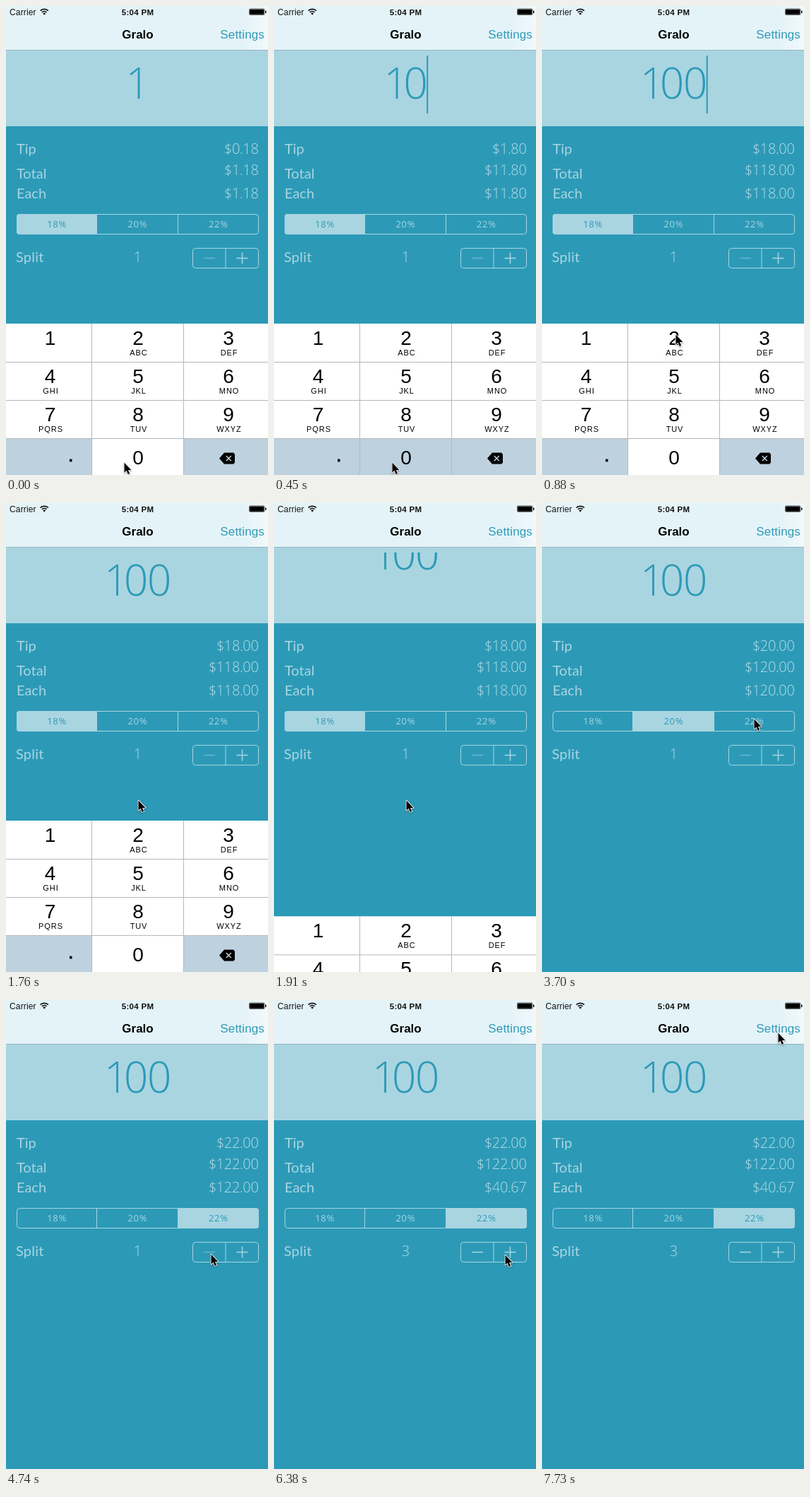
An HTML page with a canvas for the animation above (8000 ms loop, 371 by 663 pixels).

```html
<!DOCTYPE html>
<html lang="en">
<head>
<meta charset="utf-8">
<title>Tip calculator</title>
<style>
html, body { margin: 0; width: 100%; height: 100%; overflow: hidden; background: #2c9ab7; }
canvas { display: block; width: 371px; height: 663px; }
</style>
</head>
<body>
<canvas id="stage"></canvas>
<script>
const W = 371, H = 663, LOOP = 8000, STEP = 148.6;
const TEAL = '#2c9ab7', PALE = '#a9d5e1', KEY = '#bed1de';
const SANS = '"Liberation Sans", Arial, sans-serif';
const WORD = 'Lato, sans-serif';
const NUM = '"Open Sans", sans-serif';

const canvas = document.getElementById('stage');
const ctx = canvas.getContext('2d');
const dpr = window.devicePixelRatio || 1;
canvas.width = Math.round(W * dpr);
canvas.height = Math.round(H * dpr);

// Pointer waypoints: step, x, y
const path = [
  [0, 167, 645], [4, 167, 645], [6, 189, 464], [10, 187, 420], [14, 187, 420],
  [16, 187, 331], [17, 191, 316], [18, 194, 309], [21, 194, 309], [25, 300, 305],
  [31, 300, 305], [32, 290, 359], [34, 329, 369], [36, 328, 364], [37, 327, 360],
  [48, 327, 360], [52, 334, 46]
];

function pointerAt(n) {
  const i = path.findIndex(p => p[0] > n);
  if (i < 0) return path[path.length - 1].slice(1);
  const [a, ax, ay] = path[i - 1], [b, bx, by] = path[i];
  const k = (n - a) / (b - a);
  return [ax + (bx - ax) * k, ay + (by - ay) * k];
}

function stateAt(n) {
  const slide = n > 12 ? 1 - Math.exp(-Math.pow(n - 12, 1.3)) : 0;
  return {
    amount: n < 2 ? '1' : n < 4 ? '10' : '100',
    caret: n >= 1 && n <= 8,
    zeroDown: n === 1 || n === 3,
    slide,
    textShift: n > 12 ? -100 * (1 - slide) : 0,
    seg: n < 21 ? 0 : n < 28 ? 1 : 2,
    segDown: n === 20 ? 1 : n === 27 ? 2 : -1,
    split: n < 36 ? 1 : n < 43 ? 2 : 3,
    plusDown: n === 35 || n === 36 || n === 42,
    pointer: pointerAt(n)
  };
}

function rect(x, y, w, h, fill) {
  ctx.fillStyle = fill;
  ctx.fillRect(x, y, w, h);
}

function text(str, x, y, font, fill, align = 'left', gap = 0) {
  ctx.font = font;
  ctx.fillStyle = fill;
  ctx.textAlign = align;
  ctx.letterSpacing = gap + 'px';
  ctx.fillText(str, x, y);
}

function line(x1, y1, x2, y2, stroke, width = 1) {
  ctx.strokeStyle = stroke;
  ctx.lineWidth = width;
  ctx.beginPath();
  ctx.moveTo(x1, y1);
  ctx.lineTo(x2, y2);
  ctx.stroke();
}

function poly(points) {
  ctx.beginPath();
  points.forEach(([x, y]) => ctx.lineTo(x, y));
  ctx.closePath();
}

function roundBox(x, y, w, h, r) {
  ctx.beginPath();
  ctx.roundRect(x, y, w, h, r);
}

function drawHeader() {
  const g = ctx.createLinearGradient(335, 0, W, 0);
  g.addColorStop(0, '#e4f3f8');
  g.addColorStop(1, '#f1f9fb');
  rect(0, 0, W, 62, g);
  rect(0, 62, W, 1, '#94b5bf');

  text('Carrier', 5, 13, `12px ${SANS}`, '#111', 'left', 0.15);
  text('5:04 PM', 186.5, 12.5, `bold 11.5px ${SANS}`, '#111', 'center', 0.3);

  ctx.strokeStyle = '#111';
  ctx.lineWidth = 1.7;
  for (const r of [4.8, 8]) {
    ctx.beginPath();
    ctx.arc(54.2, 12.3, r, -Math.PI * 0.75, -Math.PI * 0.25);
    ctx.stroke();
  }
  ctx.fillStyle = '#111';
  ctx.beginPath();
  ctx.moveTo(54.2, 12.8);
  ctx.arc(54.2, 12.3, 2.7, -Math.PI * 0.75, -Math.PI * 0.25);
  ctx.fill();

  roundBox(344.5, 4, 21.5, 8.5, 1.5);
  ctx.lineWidth = 0.7;
  ctx.stroke();
  rect(345.2, 4.8, 20, 7, '#000');
  rect(367, 6.6, 1.5, 3.4, '#111');

  text('Gralo', 186.5, 46, `bold 17px ${SANS}`, '#000', 'center');
  text('Settings', 366, 46, `17px ${SANS}`, TEAL, 'right', 0.15);
}

function drawAmount(s) {
  rect(0, 63, W, 107, PALE);
  ctx.save();
  ctx.beginPath();
  ctx.rect(0, 70, W, 82);
  ctx.clip();
  const widths = [...s.amount].map(c => c === '1' && s.amount.length > 1 ? 28 : 33);
  let x = 186.5 - widths.reduce((a, b) => a + b) / 2;
  [...s.amount].forEach((c, i) => {
    text(c, x - 0.6, 131 + s.textShift, `300 60px ${NUM}`, TEAL);
    x += widths[i];
  });
  if (s.caret) rect(x - 0.8, 70, 2, 82, TEAL);
  ctx.restore();
}

function drawTotals(s) {
  const bill = Number(s.amount);
  const tip = bill * (18 + s.seg * 2) / 100;
  const total = bill + tip;
  const rows = [
    ['Tip', tip, 209, 209],
    ['Total', total, 244, 239],
    ['Each', total / s.split, 272, 272]
  ];
  for (const [name, value, labelY, valueY] of rows) {
    text(name, 15, labelY, `20px ${WORD}`, PALE);
    text('$' + value.toFixed(2), 357.5, valueY, `300 20px ${NUM}`, '#b4dbe6', 'right', -0.35);
  }
}

function drawSegments(s) {
  const edges = [15, 129, 243.5, 358];
  ctx.save();
  roundBox(15, 294, 343, 29, 4);
  ctx.clip();
  for (let i = 0; i < 3; i++) {
    const x = edges[i], w = edges[i + 1] - x;
    if (i === s.seg) rect(x, 294, w, 29, PALE);
    else if (i === s.segDown) rect(x, 294, w, 29, 'rgba(169,213,225,.2)');
    text(18 + i * 2 + '%', x + w / 2, 313, `13px ${NUM}`, i === s.seg ? TEAL : PALE, 'center', 0.6);
  }
  ctx.restore();
  roundBox(15.5, 294.5, 342, 28, 4);
  ctx.strokeStyle = PALE;
  ctx.lineWidth = 1;
  ctx.stroke();
  line(128.5, 294, 128.5, 323, PALE);
  line(243.5, 294, 243.5, 323, PALE);
}

function drawSplit(s) {
  text('Split', 14, 362, `20px ${WORD}`, PALE, 'left', 0.2);
  text(s.split, 186.5, 362, `300 20px ${NUM}`, '#b4dbe6', 'center');
  if (s.plusDown) {
    roundBox(311, 342, 47, 29, [0, 4, 4, 0]);
    ctx.fillStyle = 'rgba(169,213,225,.2)';
    ctx.fill();
  }
  roundBox(264.5, 342.5, 93, 28, 4);
  ctx.strokeStyle = PALE;
  ctx.lineWidth = 1;
  ctx.stroke();
  line(311, 342, 311, 371, PALE);
  line(280, 356.5, 296, 356.5, s.split > 1 ? PALE : '#67b4ca', 1.5);
  line(326.5, 356.5, 342.5, 356.5, PALE, 1.5);
  line(334.5, 348.5, 334.5, 364.5, PALE, 1.5);
}

function drawKeypad(s) {
  const letters = ['', 'ABC', 'DEF', 'GHI', 'JKL', 'MNO', 'PQRS', 'TUV', 'WXYZ'];
  const cols = [62.5, 187, 315];
  ctx.save();
  ctx.translate(0, 449 + 214 * s.slide);
  rect(0, 0, W, 214, '#fff');
  rect(0, 162, 122, 52, KEY);
  rect(251, 162, 120, 52, KEY);
  if (s.zeroDown) rect(122, 162, 129, 52, KEY);

  letters.forEach((label, i) => {
    const x = cols[i % 3], y = 54 * Math.floor(i / 3);
    text(i + 1, x, y + 30, `28px ${SANS}`, '#000', 'center');
    text(label, x + 1, y + 45, `11px ${SANS}`, '#000', 'center', 0.9);
  });
  text('0', 187, 199, `28px ${SANS}`, '#000', 'center');
  rect(90, 191.5, 3.5, 3.8, '#000');

  const lineColor = '#b3b8bb';
  for (const y of [54, 108, 162]) rect(0, y, W, 1, lineColor);
  for (const x of [121, 251]) rect(x, 0, 1, 214, lineColor);

  poly([[302, 190.5], [309, 182.5], [322, 182.5], [324, 184.5], [324, 196.5], [322, 198.5], [309, 198.5]]);
  ctx.fillStyle = '#000';
  ctx.fill();
  line(311.8, 187, 318.8, 194, KEY, 1.5);
  line(318.8, 187, 311.8, 194, KEY, 1.5);
  ctx.restore();
}

function drawPointer([x, y]) {
  ctx.save();
  ctx.translate(x, y);
  poly([[0.5, 0.5], [0.5, 14.5], [3.6, 11.7], [5.8, 17], [8.2, 16], [6, 10.9], [10.4, 10.9]]);
  ctx.shadowColor = 'rgba(0,0,0,.4)';
  ctx.shadowBlur = 2 * dpr;
  ctx.shadowOffsetY = dpr;
  ctx.lineJoin = 'round';
  ctx.lineWidth = 1.8;
  ctx.strokeStyle = '#fff';
  ctx.stroke();
  ctx.shadowColor = 'transparent';
  ctx.fillStyle = '#000';
  ctx.fill();
  ctx.restore();
}

function draw(now) {
  const n = Math.min(52, Math.floor((now % LOOP + 24) / STEP));
  const s = stateAt(n);
  ctx.setTransform(dpr, 0, 0, dpr, 0, 0);
  rect(0, 0, W, H, TEAL);
  drawHeader();
  drawAmount(s);
  drawTotals(s);
  drawSegments(s);
  drawSplit(s);
  if (s.slide < 0.999) drawKeypad(s);
  drawPointer(s.pointer);
}

const start = performance.now();
function tick() {
  draw(performance.now() - start);
  requestAnimationFrame(tick);
}
tick();
</script>
</body>
</html>
```
